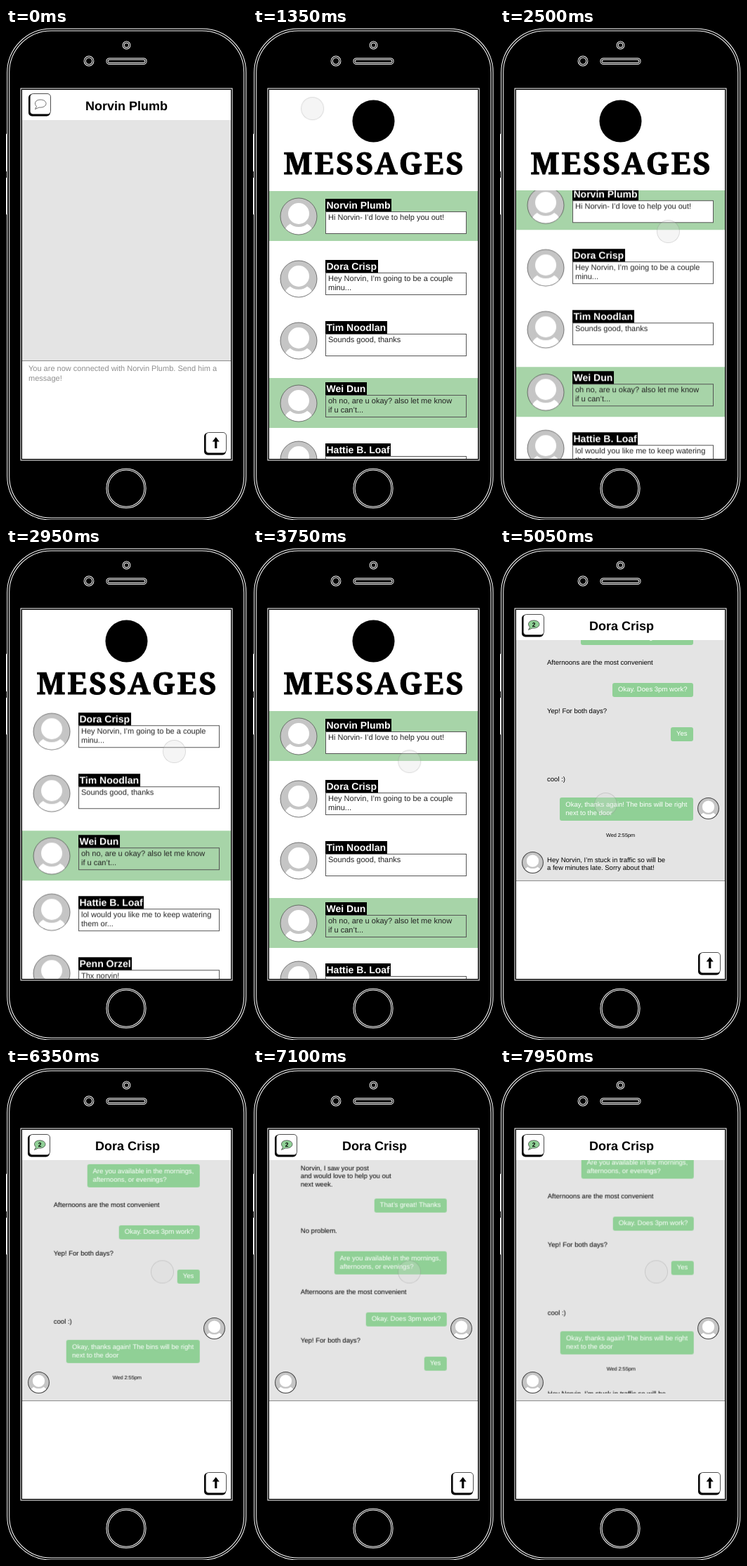
Recreate the animation shown at these times as an HTML page. Size 343 by 700 pixels, loop 8000 ms.

```html
<!DOCTYPE html>
<html lang="en">
<head>
<meta charset="utf-8">
<title>Messages</title>
<style>
  html, body { margin: 0; width: 100%; height: 100%; overflow: hidden; background: #000; }
  #stage { position: relative; width: 343px; height: 700px; overflow: hidden; background: #000;
    font-family: "Liberation Sans", Arial, sans-serif; color: #000; text-rendering: geometricPrecision; }
  #stage div, #stage svg { position: absolute; box-sizing: border-box; }
  .layer { left: 0; top: 0; width: 343px; height: 700px; }
  .heading { left: 0; top: 100px; width: 343px; font: bold 18px/22px "Liberation Sans", Arial, sans-serif; text-align: center; }
  .thread { left: 23px; top: 131px; width: 297px; height: 343px; background: #e4e4e4; border-bottom: 1px solid #8c8c8c; }
  .hint { left: 32px; top: 479px; font-size: 11px; line-height: 13.5px; color: #8f8f8f; white-space: pre; }
  .line { font-size: 9.55px; line-height: 11.5px; white-space: pre; }
  .bubble { right: 68.5px; padding: 0 8px; display: grid; align-content: center; border-radius: 3px;
    background: #90d096; color: #fff; font-size: 9.55px; line-height: 11.5px; white-space: pre; }
  .stamp { left: 0; width: 343px; top: 404px; font-size: 7.3px; line-height: 10px; text-align: center; }
  .band { left: 23px; width: 297px; height: 71px; background: #a7d4a8; }
  .name { left: 103px; height: 18px; padding: 0 1.5px; background: #000; color: #fff;
    font: bold 14px/18px "Liberation Sans", Arial, sans-serif; white-space: pre; }
  .preview { left: 103px; width: 201px; height: 32px; padding: 2px 3px; border: 1px solid #555;
    font-size: 11px; line-height: 13.3px; color: #222; white-space: pre; }
  #cursor { left: -16.5px; top: -16.5px; width: 33px; height: 33px; border-radius: 50%;
    background: rgba(220, 220, 220, .28); border: 1px solid rgba(0, 0, 0, .11); }
</style>
</head>
<body>
<div id="stage"></div>
<script>
const DURATION = 8000;
const SMOOTH = 'cubic-bezier(.37,0,.63,1)';
const stage = document.getElementById('stage');

const svg = body => `<svg class="layer" viewBox="0 0 343 700">${body}</svg>`;
const lines = list => list.join('\n');

// A black line with a thin white fringe on both sides.
const fringed = (shapes, core) => `
  <g fill="none" stroke="#fff" stroke-width="${core + 2}">${shapes}</g>
  <g fill="none" stroke="#000" stroke-width="${core}">${shapes}</g>`;

const avatar = (x, y, r, stroke) => `
  <svg style="left:${x - r - 1}px;top:${y - r - 1}px" width="${2 * r + 2}" height="${2 * r + 2}" viewBox="-27 -27 54 54">
    <clipPath id="face"><circle r="26"/></clipPath>
    <circle r="26" fill="#c5c5c5"/>
    <g clip-path="url(#face)" fill="#fff">
      <ellipse cy="22" rx="20" ry="14"/>
      <circle cy="-4" r="17" stroke="#c5c5c5" stroke-width="4"/>
    </g>
    <circle r="26" fill="none" stroke="#444" stroke-width="${stroke}"/>
  </svg>`;

const button = (x, y, icon) => `
  <g transform="translate(${x} ${y})">
    <rect y="1" width="31" height="31.5" rx="5"/>
    <rect x="2.2" y=".5" width="29.3" height="29.3" rx="4.5" fill="#fff" stroke="#222" stroke-width=".8"/>
    ${icon}
  </g>`;

const speech = (fill, label) => `
  <path d="M11.5 18.5C7.5 15 9.5 9 17 9C22 9 25 11.5 25 14.5C25 18 21 20.5 15 20L9.5 22.5Z"
    fill="${fill}" stroke="#333" stroke-width=".7"/>
  <text x="17" y="17.7" font-size="8.5" font-weight="bold" text-anchor="middle">${label}</text>`;

const arrow = '<path d="M16.7 7L21.7 13.5H18.3V23H15.1V13.5H11.7Z"/>';

const chatFrame = (title, dx, icon) => `
  <div class="heading" style="left:${dx}px">${title}</div>
  <div class="thread"></div>
  ${svg(icon + button(282, 575, arrow))}`;

const said = (y, ...list) =>
  `<div class="line" style="left:67px;top:${y - 5.75}px">${lines(list)}</div>`;
const sent = (y, height, ...list) =>
  `<div class="bubble" style="top:${y}px;height:${height}px">${lines(list)}</div>`;

const conversation = [
  said(-12.7, 'Norvin, I saw your post', 'and would love to help you out', 'next week.'),
  sent(30.3, 19.5, 'That’s great! Thanks'),
  said(76.5, 'No problem.'),
  sent(105.3, 33, 'Are you available in the mornings,', 'afternoons, or evenings?'),
  said(164, 'Afternoons are the most convenient'),
  sent(192, 19.5, 'Okay. Does 3pm work?'),
  said(233, 'Yep! For both days?'),
  sent(255, 19.5, 'Yes'),
  said(329.5, 'cool :)'),
  sent(355.3, 33, 'Okay, thanks again! The bins will be right', 'next to the door'),
  '<div class="stamp">Wed 2:55pm</div>',
  said(444.5, 'Hey Norvin, I’m stuck in traffic so will be', 'a few minutes late. Sorry about that!')
].join('');

const inbox = [
  { name: 'Norvin Plumb', text: ['Hi Norvin- I’d love to help you out!'], face: 16, band: true, fill: '#fff' },
  { name: 'Dora Crisp', text: ['Hey Norvin, I’m going to be a couple', 'minu...'], face: 18 },
  { name: 'Tim Noodlan', text: ['Sounds good, thanks'], face: 19 },
  { name: 'Wei Dun', text: ['oh no, are u okay? also let me know', 'if u can’t...'], face: 21, band: true },
  { name: 'Hattie B. Loaf', text: ['lol would you like me to keep watering', 'them or...'], face: 14 },
  { name: 'Penn Orzel', text: ['Thx norvin!'], face: 14 }
];

const inboxRow = ({ name, text, face, band, fill = 'none' }, i) => {
  const y = 252 + 87 * i;
  return `
    ${band ? `<div class="band" style="top:${y + face - 36}px"></div>` : ''}
    ${avatar(65, y + face, 26, .7)}
    <div class="preview" style="top:${y + 9}px;background:${fill}">${lines(text)}</div>
    <div class="name" style="top:${y - 9}px">${name}</div>`;
};

const phoneBody = `
  <rect x="3.2" y="2.5" width="337" height="696" rx="61"/>`;
const phoneParts = `
  <circle cx="171.5" cy="24.5" r="4.3"/>
  <circle cx="118" cy="47" r="5.8"/>
  <rect x="144" y="44" width="55" height="6.5" rx="3.2"/>
  <circle cx="171" cy="655" r="27"/>`;

stage.innerHTML = `
  ${svg(`
    ${fringed(phoneBody, 2)}
    ${fringed(phoneParts, 1.2)}
    <path d="M2 151H.5V204M.5 213V265H2" fill="none" stroke="#fff"/>
    <rect x="20.5" y="85.5" width="302" height="530" fill="#fff"/>
    <rect x="22.25" y="87.25" width="298.5" height="526.5" fill="#fff" stroke="#000" stroke-width="1.5"/>`)}

  <div class="layer" id="newChat">
    ${chatFrame('Norvin Plumb', 0, button(32, 93, speech('#fff', '')))}
    <div class="hint">${lines(['You are now connected with Norvin Plumb. Send him a', 'message!'])}</div>
  </div>

  <div class="layer" id="messages">
    ${svg(`
      <circle cx="171.5" cy="132.5" r="30"/>
      <text x="173" y="208" font-family="'Noto Serif', serif" font-size="43" font-weight="900"
        letter-spacing="2.8" text-anchor="middle" stroke="#000" stroke-width="1">MESSAGES</text>`)}
    <div class="layer" style="clip-path:inset(231px 23px 87px 23px)">
      <div class="layer" id="list">${inbox.map(inboxRow).join('')}</div>
    </div>
  </div>

  <div class="layer" id="chat">
    ${chatFrame('Dora Crisp', 1.5, button(31, 94, speech('#90d096', '2')))}
    <div class="layer" style="clip-path:inset(131px 23px 237px 23px)">
      <div class="layer" id="talk">${conversation}</div>
    </div>
    ${avatar(296, 370, 14.5, 1.8)}
    ${avatar(46.5, 447, 14.5, 1.8)}
  </div>

  <div id="cursor"></div>`;

// Each step is [time in ms, value, easing towards the next step].
function play(id, property, steps) {
  const frames = steps.map(([time, value, easing = 'linear']) =>
    ({ offset: time / DURATION, [property]: value, easing }));
  document.getElementById(id).animate(frames, { duration: DURATION, iterations: Infinity });
}

function show(id, from, to) {
  const steps = [[0, from > 0 ? 0 : 1]];
  if (from > 0) steps.push([from, 0], [from, 1]);
  if (to < DURATION) steps.push([to, 1], [to, 0]);
  steps.push([DURATION, to < DURATION ? 0 : 1]);
  play(id, 'opacity', steps);
}

const at = (x, y) => `translate(${x}px, ${y}px)`;

const LIST_OPEN = 1050, CHAT_OPEN = 4600;
show('newChat', 0, LIST_OPEN);
show('messages', LIST_OPEN, CHAT_OPEN);
show('chat', CHAT_OPEN, DURATION);

play('list', 'transform', [
  [0, at(0, 0)], [2330, at(0, 0), SMOOTH], [2970, at(0, -96), SMOOTH],
  [3650, at(0, 0)], [DURATION, at(0, 0)]
]);

// The scroll back down is still under way when the loop restarts.
const scrollBack = t => 155.7 * (1 + Math.cos(Math.PI * (t - 7100) / 1100)) / 2;
play('talk', 'transform', [
  [0, at(0, 0)], [6030, at(0, 0)], [6030, at(.7, 0), SMOOTH],
  ...Array.from({ length: 10 }, (_, i) => 7100 + 100 * i).map(t => [t, at(.7, scrollBack(t))])
]);

play('cursor', 'opacity', [[0, 0], [100, 0], [300, 1], [DURATION, 1]]);
play('cursor', 'transform', [
  [0, at(152, 105)], [100, at(152, 105), SMOOTH], [850, at(55, 110)],
  [1130, at(55, 110), 'ease-in'], [1350, at(84, 114), 'cubic-bezier(.4,.2,.8,.8)'],
  [1750, at(178, 203), 'ease-out'], [2200, at(239, 289)],
  [3590, at(239, 289), SMOOTH], [4150, at(150, 364)],
  [5200, at(150, 364), SMOOTH], [5950, at(222, 295), 'ease-out'],
  [6200, at(222, 289.5)], [DURATION, at(222, 289.5)]
]);
</script>
</body>
</html>
```
